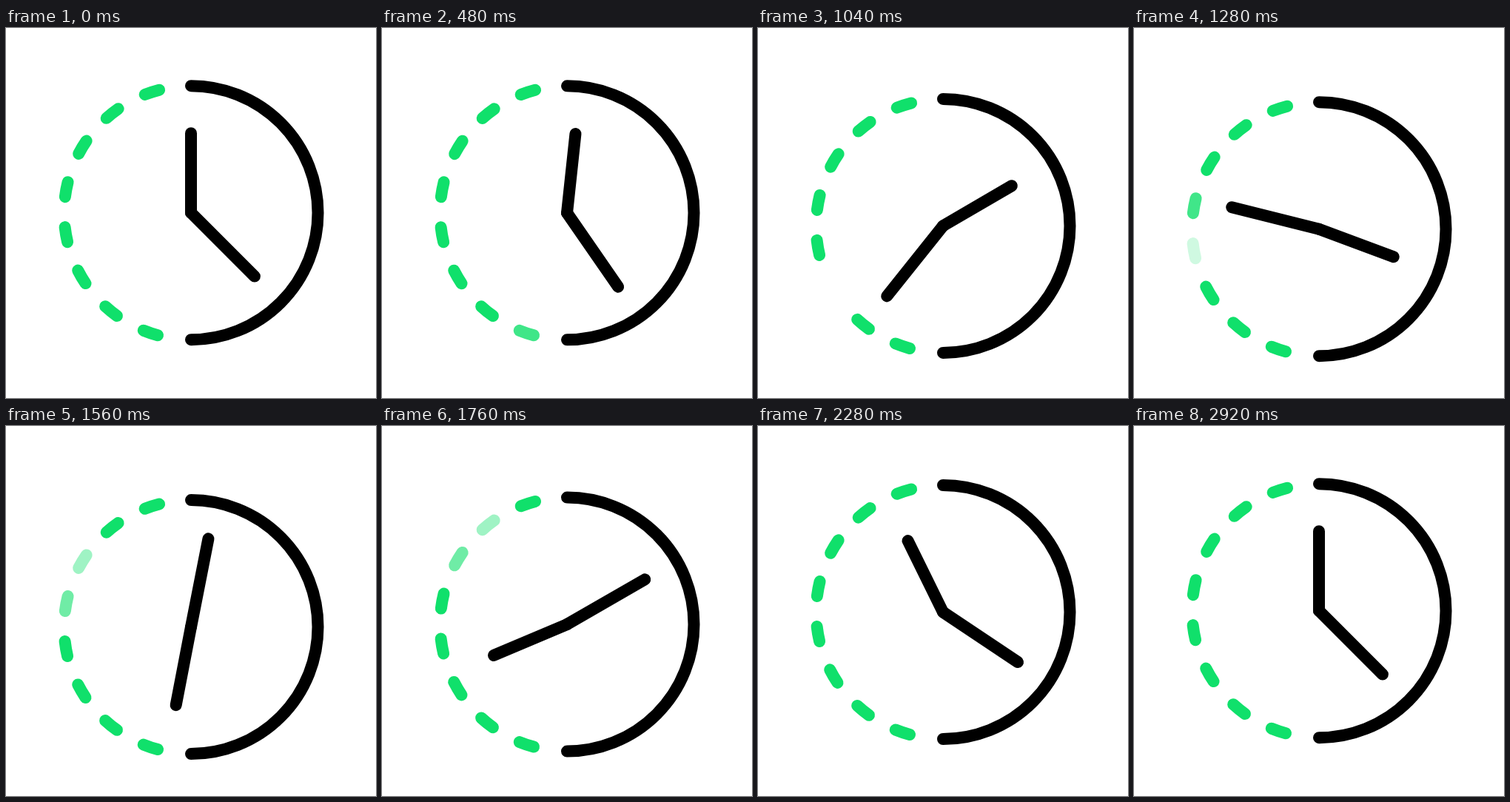
An HTML page for the animation above (3 s loop, 500 by 500 pixels).

```html
<!DOCTYPE html>
<html lang="en">
<head>
<meta charset="utf-8">
<title>Clock</title>
<style>
  html, body { margin: 0; width: 100%; height: 100%; overflow: hidden; background: #fff; }
  svg { display: block; width: 100%; height: 100%; }
</style>
</head>
<body>
<svg viewBox="0 0 500 500" fill="none" stroke="#000" stroke-width="16" stroke-linecap="round">
  <g id="clock">
    <g id="dashes" stroke="#10e06b"></g>
    <path id="rim"/>
    <path id="hour" d="M0 0V-107.5"/>
    <path id="minute" d="M0 0V-121.5"/>
  </g>
</svg>
<script>
const LOOP = 3000, STEP = 40;
const CENTER = { x: 250, y: 249.7 }, RADIUS = 171.5;
const DASHES = 8, DASH_GAP = 20.5, DASH_SPAN = 6.8;
const byId = id => document.getElementById(id);
const clock = byId('clock'), hour = byId('hour'), minute = byId('minute');

const clamp = v => Math.min(1, Math.max(0, v));
const progress = (t, start, length) => clamp((t - start) / length);
const smooth = x => x * x * (3 - 2 * x);

// Cubic Bezier easing with flat ends, solved by bisection.
function swing(x) {
  let low = 0, high = 1;
  for (let i = 0; i < 24; i++) {
    const s = (low + high) / 2, r = 1 - s;
    const at = 3 * 0.563 * s * r * r + 3 * 0.42 * s * s * r + s * s * s;
    if (at < x) low = s; else high = s;
  }
  return x <= 0 ? 0 : x >= 1 ? 1 : smooth((low + high) / 2);
}

// Angles are in degrees, clockwise from twelve o'clock.
function arc(from, to) {
  const point = deg => {
    const a = deg * Math.PI / 180;
    return `${(RADIUS * Math.sin(a)).toFixed(2)} ${(-RADIUS * Math.cos(a)).toFixed(2)}`;
  };
  return `M${point(from)}A${RADIUS} ${RADIUS} 0 0 1 ${point(to)}`;
}

byId('rim').setAttribute('d', arc(0, 180));

// Dashes run clockwise from the bottom.
const dashes = Array.from({ length: DASHES }, (_, i) => {
  const dash = document.createElementNS('http://www.w3.org/2000/svg', 'path');
  const end = -14.5 - DASH_GAP * (DASHES - 1 - i);
  dash.setAttribute('d', arc(end - DASH_SPAN, end));
  return byId('dashes').appendChild(dash);
});

function draw(t) {
  const drop = 22 * (smooth(progress(t, 442, 833)) - smooth(progress(t, 1522, 920)));
  clock.setAttribute('transform', `translate(${CENTER.x} ${CENTER.y + drop})`);
  hour.setAttribute('transform', `rotate(${360 * swing(progress(t, 150, 2783))})`);
  minute.setAttribute('transform', `rotate(${135 + 360 * swing(progress(t, 85, 2618))})`);
  dashes.forEach((dash, i) => {
    dash.setAttribute('opacity', clamp(Math.abs(t - 640 - 200 * i) / 200));
  });
}

const begin = performance.now();
function tick() {
  const t = (performance.now() - begin) % LOOP;
  draw(Math.floor(t / STEP) * STEP);
  requestAnimationFrame(tick);
}
tick();
</script>
</body>
</html>
```
